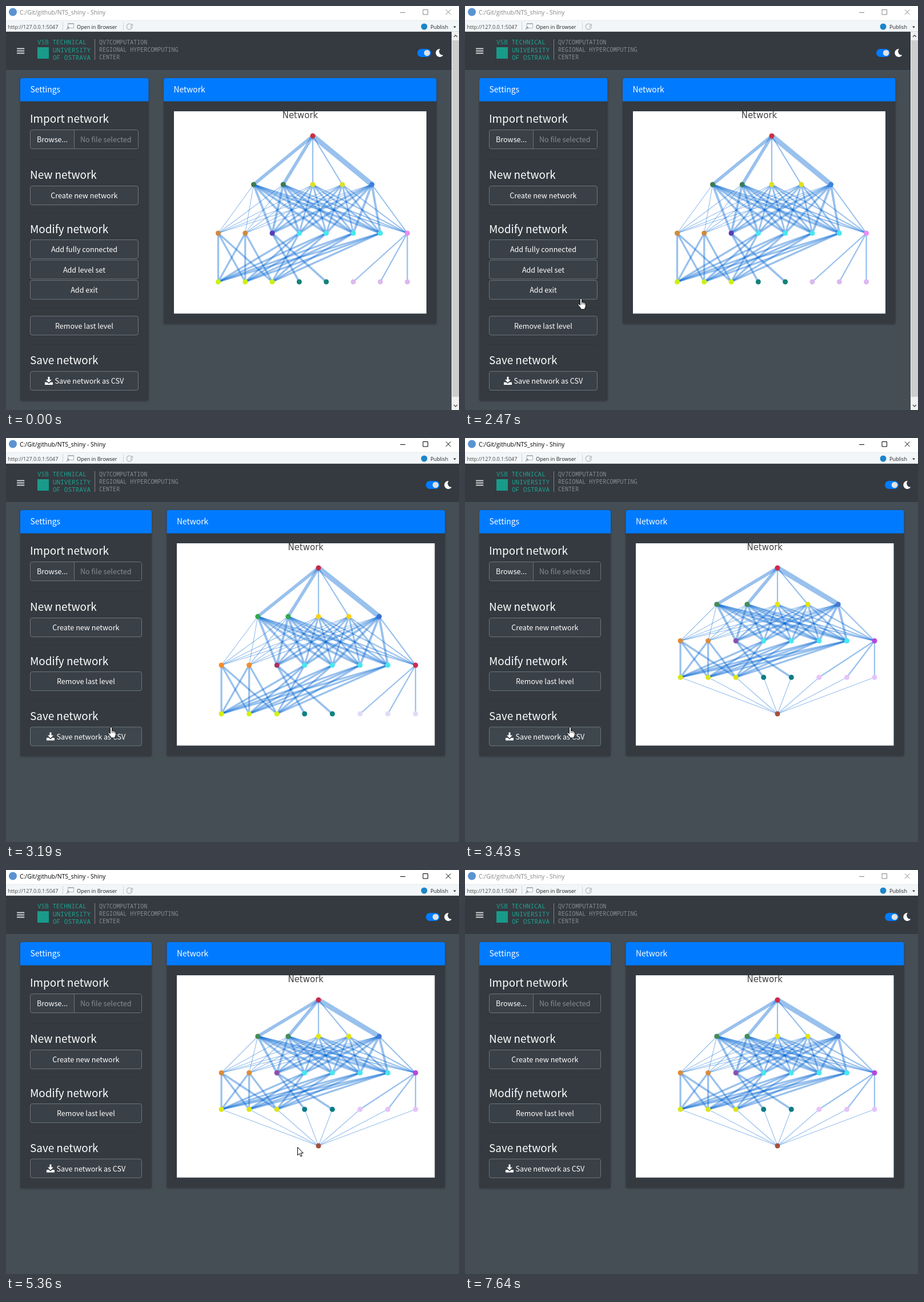
Animation, 793 px wide and 706 px high, one loop 7.78 s. Source, as an HTML page:

```html
<!DOCTYPE html>
<html lang="en">
<head>
<meta charset="utf-8">
<title>Network editor</title>
<style>
html, body { margin: 0; width: 100%; height: 100%; overflow: hidden; background: #454d55; }
svg { display: block; width: 793px; height: 706px; }
.ui { font-family: "Noto Sans CJK JP", "Noto Sans CJK SC", "Noto Sans CJK", "Source Sans Pro", sans-serif; fill: #fff; }
.win { font-family: "Open Sans", "Noto Sans", sans-serif; }
.mono { font-family: "Noto Sans Mono", "DejaVu Sans Mono", monospace; }
.card { filter: drop-shadow(0 1px 1.5px rgba(0,0,0,.25)); }
.button rect { fill: #3a4047; stroke: #6c757d; }
.button.hover rect { fill: #3f474e; }
</style>
</head>
<body>
<svg id="stage" viewBox="0 0 793 706"></svg>
<script>
const LOOP = 7780;
const ACTIVATE = 3030, RELAYOUT = 3110, EXIT_ADDED = 3340, DEACTIVATE = 7640;

const rect = (x, y, w, h, fill, extra = '') =>
  `<rect x="${x}" y="${y}" width="${w}" height="${h}" fill="${fill}" ${extra}/>`;
const path = (d, extra = '') => `<path d="${d}" ${extra}/>`;
const text = (x, y, size, str, extra = '') =>
  `<text x="${x}" y="${y}" font-size="${size}" ${extra}>${str}</text>`;

// ---------- window frame ----------
function windowChrome() {
  return rect(0, 0, 793, 25, '#fff') + rect(0, 25, 793, 20, '#f3f6f8') +
    rect(0, 25, 793, 1, '#e4e8ea') + rect(0, 44, 793, 1, '#d8dcdf') +
    '<circle cx="12" cy="10.5" r="7" fill="#5a93cf"/>' +
    `<g id="title" class="win">${text(24, 15, 10.4, 'C:/Git/github/NTS_shiny - Shiny')}
      ${path('M690 11.5h9M730 6.5h8.5v8.5H730zM770 6.5l8.5 8.5m0-8.5L770 15', 'fill="none" stroke="currentColor"')}</g>` +
    `<g class="win" fill="#222">${text(3.5, 39.5, 9.06, 'http://127.0.0.1:5047', 'fill="#444"')}
      ${text(124, 40, 9.06, 'Open in Browser')}${text(743, 40, 9.06, 'Publish')}</g>` +
    path('M99.500 28v14M205.500 28v14', 'stroke="#d0d4d7"') +
    path('M108.500 30.500h10v8h-10z', 'fill="#fff" stroke="#a9b3bb"') + rect(108, 30, 11, 2, '#a9b3bb') +
    path('M106 41l4-4m-3 0h3v3', 'fill="none" stroke="#8fa3b3" stroke-width="1.300"') +
    path('M220.500 33.500a5 5 0 1 0 .6 3.500h-4m4.300-6v3.500h-3.500', 'fill="none" stroke="#c3c6c8" stroke-width="1.700"') +
    '<circle cx="732" cy="36" r="5.500" fill="#1b86c9"/>' + path('M783 35.500h5l-2.500 3z', 'fill="#333"');
}

// ---------- page ----------
function navbar(dx) {
  const line = (x, y, str) => text(x, y, 11, str);
  const org = (y, str) => text(163, y, 10.05, str);
  return rect(0, 45, 793, 67, '#343a40') + rect(0, 112, 793, 1, '#4b545c') +
    [73.5, 77.5, 81.5].map(y => rect(19, y, 13.3, 2, '#d0d2d4', 'rx=".5"')).join('') +
    rect(55, 72, 20, 20, '#1a9a8a') +
    `<g class="mono" fill="#1fa292">${line(55, 67, 'VSB TECHNICAL')}${line(82, 80.5, 'UNIVERSITY')}${line(82, 94, 'OF OSTRAVA')}</g>` +
    rect(155, 58, 1, 36, '#81868b') +
    `<g class="mono" fill="#888d92">${org(66.500, 'QV7COMPUTATION')}${org(80, 'REGIONAL HYPERCOMPUTING')}${org(93, 'CENTER')}</g>` +
    `<g transform="translate(${dx})">${rect(720, 75, 24, 14, '#007bff', 'rx="7"')}
      <circle cx="737" cy="82" r="5.300" fill="#dee2e6"/>
      ${path('M760 75.100A7 7 0 1 0 765.300 85.700A6.300 6.300 0 0 1 760 75.100z', 'fill="#fff"')}</g>`;
}

function card(x, right, bottom, title) {
  const w = right - x;
  return `<g class="card">${rect(x, 126, w, bottom - 126, '#343a40', 'rx="3.500"')}
    ${path(`M${x} 166.500V129.500q0-3.500 3.500-3.500H${right - 3.5}q3.500 0 3.500 3.500V166.500z`, 'fill="#007bff"')}</g>` +
    text(x + 17.5, 151, 13.87, title);
}

function settings(wide) {
  const right = wide ? 237.5 : 231.5, mid = (42 + right) / 2 + .2;
  const heading = (y, str) => text(42, y, 18.9, str);
  const rule = y => rect(42, y, right - 42, 1, '#2f343a');
  const box = y => rect(42.5, y, right - 42.5, 33, '', 'rx="3.500"');
  const button = (y, label, id = '') =>
    `<g class="button" data-id="${id}">${box(y)}${text(mid, y + 21.500, 12.6, label, 'text-anchor="middle"')}</g>`;
  const save = y => `<g class="button" data-id="save">${box(y)}
    ${text(mid - 51.5, y + 21.500, 12.6, 'Save network as CSV')}
    <g transform="translate(${mid - 69} ${y + 9.5})">
    ${path('M5.500 0h3v5H12L7 10 2 5h3.500zM0 9.500h4L7 12l3-2.500h4V14H0z', 'fill="#fff"')}</g></g>`;

  const common = card(25, wide ? 255 : 249.5, wide ? 556 : 689.5, 'Settings') +
    heading(204, 'Import network') +
    `<g class="button">${box(216.500)}</g>` +
    path(`M119.500 217H${right - 3}q2.500 0 2.500 3V246q0 3-2.500 3H119.500z`, 'fill="#343a40"') +
    rect(119, 217, 1, 32, '#6c757d') +
    text(81, 238, 12.6, 'Browse...', 'text-anchor="middle"') +
    text(130, 238, 12.6, 'No file selected', 'fill="#878d93"') +
    rule(267.5) + heading(302, 'New network') + button(314.5, 'Create new network') +
    rule(361.5) + heading(396.5, 'Modify network');
  return common + (wide
    ? button(408.500, 'Remove last level') + rule(458) + heading(492.500, 'Save network') + save(505)
    : button(408.500, 'Add fully connected') + button(444, 'Add level set') + button(479.500, 'Add exit', 'exit') +
      rule(527) + button(542, 'Remove last level') + rule(591) + heading(625.5, 'Save network') + save(638.5));
}

// ---------- network plot ----------
const PALETTES = {
  start: 'c8323f 3a7a50 e0e020 3c82dc d08a3c 5a3cb4 46e8f0 e88cf0 ccf014 148278 dcb8f0',
  wide: 'c82848 32aa4b fad214 3c6ed2 f58c28 aa325a 46e8f0 d22850 d2f014 0f8282 e0dcfa',
  exit: 'd02850 468c55 e0e610 4678d2 dc8c3c 8c50aa 46e8f0 b946dc dce614 0a7d87 e6c3fa a5503c',
};
// One digit per node: which palette entry paints it.
const LEVELS = ['0', '11223', '44566667', '888999aaa'.slice(0, 5) + 'aaa', 'b'];

function edgeWidth(level, from, to) {
  if (level === 0) return [5.6, 5.6, 2.2, 2.2, 9][to];
  if (level === 1) {
    if (to < 2) return 1.2;
    if (to === 7) return 2.1;
    return from === 2 || from === 3 ? 3 : 4;
  }
  if (level === 2) {
    if (from === 2) return to === 3 || to === 4 ? 3.7 : 0;
    if (from === 7) return to > 4 ? 2.3 : 0;
    return to < 3 ? 3.3 : 0;
  }
  return 1.2;
}

function network(wide, exit, palette) {
  const colors = PALETTES[palette].split(' ');
  const center = wide ? 547 : 537, pitch = wide ? 48.55 : 47.3;
  const levels = LEVELS.slice(0, exit ? 5 : 4);
  const point = (level, i) => {
    const n = levels[level].length;
    return [center + (i - (n - 1) / 2) * pitch * (n === 5 ? 1.094 : 1), 227 + level * 255 / (levels.length - 1)];
  };
  let edges = '', nodes = '';
  levels.forEach((row, level) => [...row].forEach((key, i) => {
    const [x, y] = point(level, i);
    nodes += `<circle cx="${x}" cy="${y}" r="4.500" fill="#${colors[parseInt(key, 16)]}"/>`;
    [...(levels[level + 1] || '')].forEach((_, j) => {
      const width = edgeWidth(level, i, j);
      if (width) edges += path(`M${x} ${y}L${point(level + 1, j)}`, `stroke-width="${width}"`);
    });
  }));
  const left = wide ? 299 : 294, right = wide ? 750.5 : 736;
  return rect(left, 184, right - left, 353.5, '#fff') +
    text((left + right) / 2, 196, 15, 'Network', 'text-anchor="middle" fill="#444" font-family="DejaVu Sans, Verdana, sans-serif"') +
    `<g stroke="#0064d2" stroke-opacity=".4">${edges}</g>${nodes}`;
}

function scrollbar() {
  return rect(780, 45, 13, 661, '#f0f0f0') + rect(781, 60, 12, 623, '#cdcdcd') +
    path('M784 54l3-3 3 3M784 697l3 3 3-3', 'fill="none" stroke="#555" stroke-width="1.500"');
}

function page(wide, exit, palette) {
  return `<g class="page ui">${navbar(wide ? 15 : 0)}${settings(wide)}
    ${card(wide ? 281.5 : 276, wide ? 768.5 : 753.5, 555.5, 'Network')}
    ${network(wide, exit, palette)}${wide ? '' : scrollbar()}</g>`;
}

// ---------- pointer ----------
const ARROW = 'M.5 .5V14.500L3.700 11.500 6 16.700 8.200 15.700 6 10.700H10.300z';
const HAND = 'M-1.600 1.500a1.600 1.600 0 0 1 3.200 0V6.500q2.200-.600 2.600.700q2-.500 2.400.900q1.800-.200 1.800 1.500V13q0 2.300-1.400 3.800V19h-7.500v-1.700L-5 11.700q-.600-1.800.700-2.100q1.200 0 2.700 2.100z';

// start, end, number of jumps, x, y
const MOVES = [
  [140, 140, 1, 723, 693],
  [680, 1070, 6, 622, 551],
  [1690, 1690, 1, 615, 552],
  [1770, 2390, 9, 210, 512],
  [2470, 2630, 3, 184, 507],
  [2790, 2790, 1, 184, 505],
  [4590, 5360, 11, 510, 484],
  [6220, 6920, 10, 860, 792],
];
const smooth = p => p * p * (3 - 2 * p);

function pointerAt(t) {
  let x = 723, y = 720;
  for (const [start, end, jumps, toX, toY] of MOVES) {
    if (t < start) break;
    const done = t >= end ? jumps : Math.floor((t - start) * (jumps - 1) / (end - start) + .05) + 1;
    const p = smooth(done / jumps);
    x += (toX - x) * p;
    y += (toY - y) * p;
  }
  return [Math.round(x), Math.round(y)];
}

// ---------- stage ----------
const stage = document.getElementById('stage');
stage.innerHTML = rect(0, 0, 793, 706, '#454d55') +
  page(false, false, 'start') + page(true, false, 'wide') + page(true, true, 'exit') + windowChrome() +
  `<g id="pointer" fill="#fff" stroke="#000" stroke-linejoin="round">${path(ARROW)}
    <g>${path(HAND)}${path('M1.600 6.500v4M4.200 7.500v3M6.600 8.500v2.500', 'stroke-width=".800"')}</g></g>`;

const pages = [...stage.querySelectorAll('.page')];
const title = document.getElementById('title');
const pointer = document.getElementById('pointer');
const [arrow, hand] = pointer.children;
const show = (el, on) => el.setAttribute('display', on ? 'inline' : 'none');
const hover = (id, on) => stage.querySelectorAll(`[data-id=${id}]`).forEach(el => el.classList.toggle('hover', on));

function update(t) {
  const current = t < RELAYOUT ? 0 : t < EXIT_ADDED ? 1 : 2;
  pages.forEach((el, i) => show(el, i === current));

  const color = t >= ACTIVATE && t < DEACTIVATE ? '#000' : '#858585';
  title.setAttribute('color', color);
  title.setAttribute('fill', color);

  const pointing = t >= 2390 && t < 4660;
  pointer.setAttribute('transform', `translate(${pointerAt(t)})`);
  show(arrow, !pointing);
  show(hand, pointing);
  hover('exit', t >= 2550 && current === 0);
  hover('save', pointing && current > 0);
}

const began = performance.now();
function tick() {
  update((performance.now() - began) % LOOP);
  requestAnimationFrame(tick);
}
update(0);
requestAnimationFrame(tick);
</script>
</body>
</html>
```
